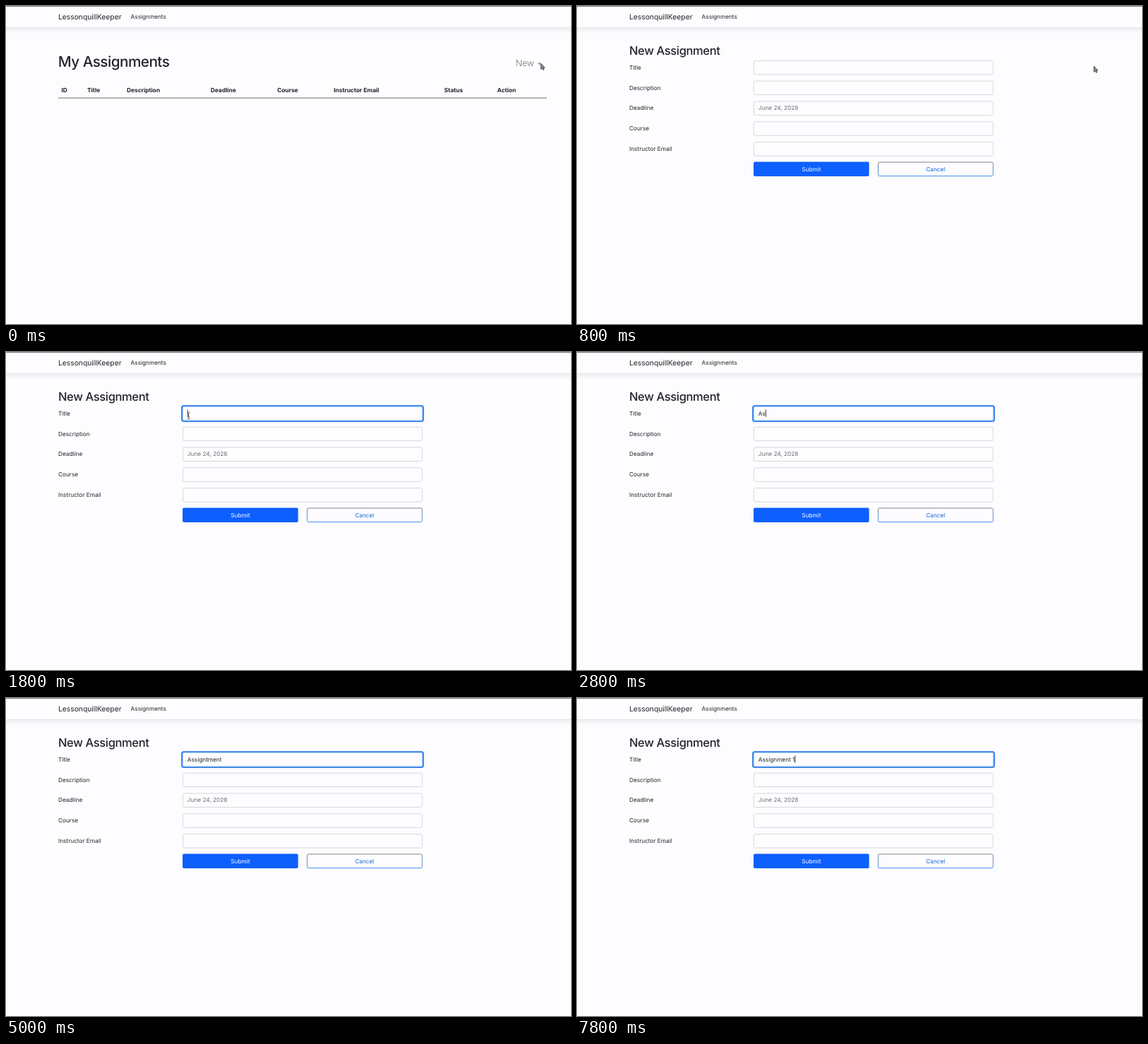
An HTML page that plays this animation: 800x450 px, repeating every 8 s.

```html
<!DOCTYPE html>
<html lang="en">
<head>
<meta charset="utf-8">
<title>Assignments</title>
<style>
  html, body { margin: 0; width: 100%; height: 100%; overflow: hidden; background: #fdfcfe; }
  svg { display: block; width: 100vw; height: 100vh; }
  text {
    font: 400 8.25px Inter, Roboto, sans-serif;
    fill: #212529;
    white-space: pre;
    text-rendering: geometricPrecision;
    font-optical-sizing: none;
  }
  .brand { font-size: 10.3px; }
  .h1 { font-size: 20.7px; font-weight: 500; letter-spacing: -.025em; }
  .h2 { font-size: 16.5px; font-weight: 500; letter-spacing: -.022em; }
  .th { font-size: 8.35px; font-weight: 700; }
  .new { font-size: 12.3px; font-weight: 200; text-anchor: middle; }
  .mid { text-anchor: middle; }
  .field { fill: #fdfcfe; stroke: #d3d5da; stroke-width: .9; }
</style>
</head>
<body>
<svg viewBox="0 0 800 450">
  <defs>
    <linearGradient id="shade" x2="0" y2="1">
      <stop offset="0" stop-color="#e6e5e8"/>
      <stop offset=".25" stop-color="#f1f0f2"/>
      <stop offset="1" stop-color="#fdfcfe"/>
    </linearGradient>
    <linearGradient id="edge" x2="0" y2="1">
      <stop offset="0" stop-color="#74777d"/>
      <stop offset="1" stop-color="#2f86ee"/>
    </linearGradient>
  </defs>

  <rect width="800" height="450" fill="#fdfcfe"/>
  <rect width="800" height="1" fill="#77767b"/>
  <rect y="30" width="800" height="9" fill="url(#shade)"/>
  <text class="brand" x="74" y="19">LessonquillKeeper</text>
  <text x="176.6" y="18.4">Assignments</text>

  <g id="list">
    <text class="h1" x="73.8" y="86">My Assignments</text>
    <g id="heads"></g>
    <rect x="74" y="129.6" width="692" height="1" fill="#707277"/>
    <g id="add">
      <rect id="addBox" x="-24.8" y="-11.7" width="49.6" height="23.4" rx="1.8" fill="#262428"/>
      <text id="addText" class="new" y="4.5">New +</text>
    </g>
  </g>

  <g id="form">
    <text class="h2" x="74" y="69">New Assignment</text>
    <g id="rows"></g>
    <rect x="250" y="220.6" width="163.6" height="20.4" rx="2" fill="#0d60fd"/>
    <text class="mid" x="331.8" y="233.8" style="fill:#fff">Submit</text>
    <rect x="426.4" y="221" width="162.8" height="19.6" rx="2" fill="none" stroke="url(#edge)" stroke-width=".9"/>
    <text class="mid" x="507.8" y="233.8" style="fill:#0d68dc">Cancel</text>
    <g id="ring" fill="none">
      <rect x="250.2" y="77.3" width="339.4" height="19.6" rx="2" stroke="#a3cbfa" stroke-width="1.4"/>
      <rect x="248.9" y="76" width="342" height="22.2" rx="3" stroke="#1a73e8" stroke-width="1.6"/>
    </g>
    <text id="typed" x="256.8" y="89.8"></text>
    <rect id="caret" y="81.5" width=".9" height="10.3" fill="#222"/>
  </g>

  <path id="arrow" d="M0 0V8.2L1.9 6.5L3.2 9.2L4.4 8.6L3.2 6H5.5Z" fill="#8b8a8f" stroke="#444348" stroke-width=".9" stroke-linejoin="round"/>
  <path id="hand" d="M-1 -3.8Q0 -5 .8 -3.8V-1L3.2 -.3Q4 0 3.8 1L3 4.4H-1.4L-3.6 .8Q-3.4 -.4 -2.2 .3L-1 1.3Z" fill="#f4f4f6" stroke="#333237" stroke-width=".7" stroke-linejoin="round"/>
  <path id="beam" d="M-2 -4.6Q0 -4.6 0 -3.4Q0 -4.6 2 -4.6M0 -3.4V3.6M-2 4.8Q0 4.8 0 3.6Q0 4.8 2 4.8M-1.2 1.6H1.2" fill="none" stroke="#626167" stroke-width="1"/>
</svg>

<script>
const LOOP = 8000, STEP = 200;
const el = id => document.getElementById(id);
const show = (node, on) => { node.style.display = on ? "" : "none"; };

function make(parent, tag, attrs, content = "") {
  const node = document.createElementNS(parent.namespaceURI, tag);
  for (const key in attrs) node.setAttribute(key, attrs[key]);
  node.textContent = content;
  parent.append(node);
}

[["ID", 78.4], ["Title", 115], ["Description", 171], ["Deadline", 289.8], ["Course", 384],
 ["Instructor Email", 464], ["Status", 620.6], ["Action", 695.6]]
  .forEach(([name, x]) => make(el("heads"), "text", { x, y: 122.2, class: "th" }, name));

["Title", "Description", "Deadline", "Course", "Instructor Email"].forEach((name, i) => {
  const y = 77.4 + i * 28.8;
  make(el("rows"), "text", { x: 74, y: y + 12.4 }, name);
  make(el("rows"), "rect", { x: 250.4, y, width: 338.8, height: 19.5, rx: 2, class: "field" });
  if (name === "Deadline")
    make(el("rows"), "text", { x: 256.8, y: y + 12.4, style: "fill:#6c6f75" }, "June 24, 2028");
});

// [start, pointer, x, y]
const pointer = [
  [0, "arrow", 757.4, 81.4], [200, "hand", 755.5, 82.6], [400, "hand", 754.6, 83],
  [600, "hand", 754.2, 83.2], [800, "arrow", 732, 85.2], [1000, "arrow", 470, 87],
  [1200, "beam", 262, 90], [1400, "beam", 258.6, 90], [2600, "none", 0, 0]
];

// [start, text, caret position or -1 when hidden]
const edits = [[0, "", -1], [1400, "", 0], [2200, "", -1]];
const typo = "Assigntment", fixed = "Assignment";
for (let n = 1; n <= typo.length; n++) edits.push([2400 + n * STEP, typo.slice(0, n), n]);
edits.push(
  [5000, typo, -1], [5200, typo, 9], [5400, typo, 8], [5800, typo, 7],
  [6400, fixed, 6], [6600, fixed, 8], [6800, fixed, 10],
  [7000, fixed + " ", 11], [7200, fixed + " 1", 12], [7400, fixed + " 1", -1],
  [7800, fixed + " 1", 12]
);

const at = (list, t) => list.filter(item => item[0] <= t).pop();

function draw(t) {
  const onList = t < 800, hover = onList && t >= 200;
  show(el("list"), onList);
  show(el("form"), !onList);

  const scale = !hover ? 1 : t < 400 ? 1.12 : 1.2;
  el("add").setAttribute("transform", `translate(${hover ? 740.9 : 740.4} 80.1) scale(${scale})`);
  show(el("addBox"), hover);
  el("addText").style.fill = hover ? "#e4ebf2" : "#3a3c41";

  show(el("ring"), t >= 1400);
  el("ring").style.opacity = t < 1600 ? .5 : 1;

  const [, text, pos] = at(edits, t);
  const typed = el("typed");
  typed.textContent = text;
  show(el("caret"), pos >= 0);
  if (!onList && pos >= 0) {
    const w = pos ? typed.getSubStringLength(0, pos) : 0;
    el("caret").setAttribute("x", 256.8 + w);
  }

  const [, kind, x, y] = at(pointer, t);
  for (const id of ["arrow", "hand", "beam"]) show(el(id), id === kind);
  if (kind !== "none") el(kind).setAttribute("transform", `translate(${x} ${y})`);
}

const start = performance.now();
function tick() {
  const t = (performance.now() - start) % LOOP;
  draw(Math.floor(t / STEP) * STEP);
  requestAnimationFrame(tick);
}
tick();
</script>
</body>
</html>
```
